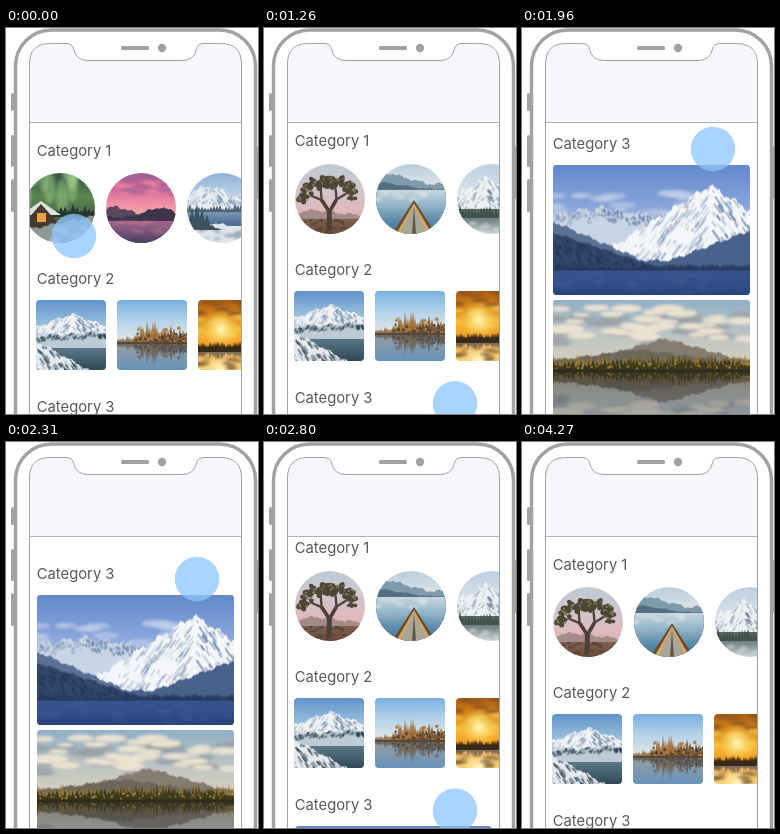
Recreate the animation shown at these times as an HTML page with a canvas. Size 252 px wide and 386 px high, loop 4.34 s.

```html
<!DOCTYPE html>
<html lang="en">
<head>
<meta charset="utf-8">
<title>Scrolling categories</title>
<style>
  html, body { margin: 0; width: 100%; height: 100%; overflow: hidden; background: #fff; }
  canvas { display: block; }
</style>
</head>
<body>
<canvas id="stage" width="252" height="386"></canvas>
<script>
const LOOP = 4340, STEP = 70, GREY = '#a2a2a4', SCROLL = 263.5;
const ctx = document.getElementById('stage').getContext('2d');

const clamp = v => Math.min(1, Math.max(0, v));
const ease = v => { v = clamp(v); return v * v * (3 - 2 * v); };

// ---- Picture helpers, all drawing into g ----
let g, seed;
const random = () => (seed = seed * 16807 % 2147483647) / 2147483647;
const jag = x => Math.sin(x * .31) + .6 * Math.sin(x * .83) + .4 * Math.sin(x * 1.9);

function photo(w, h, radius, paint) {
  const canvas = document.createElement('canvas');
  canvas.width = w;
  canvas.height = h;
  g = canvas.getContext('2d');
  seed = 77;
  g.beginPath();
  g.roundRect(0, 0, w, h, radius);
  g.clip();
  paint();
  return canvas;
}

function band(y0, y1, ...colors) {
  const fill = g.createLinearGradient(0, y0, 0, y1);
  colors.forEach((c, i) => fill.addColorStop(i / (colors.length - 1), c));
  g.fillStyle = fill;
  g.fillRect(0, y0, g.canvas.width, y1 - y0);
}

function triangle(color, x, top, base, half) {
  g.fillStyle = color;
  g.beginPath();
  g.moveTo(x - half, base);
  g.lineTo(x, top);
  g.lineTo(x + half, base);
  g.fill();
}

function specks(color, count, x, y, w, h, size, flat = 1) {
  g.fillStyle = color;
  for (let i = 0; i < count; i++) {
    const r = size * (.5 + random() / 2);
    g.beginPath();
    g.ellipse(x + w * random(), y + h * random(), r, r * flat, 0, 0, 7);
    g.fill();
  }
}

function clouds(color, count, y0, y1, size, flat = .25) {
  g.filter = 'blur(1.5px)';
  specks(color, count, 0, y0, g.canvas.width, y1 - y0, size, flat);
  g.filter = 'none';
}

function ridge(color, peak, top, base, spread, rough = 1) {
  const { width, height } = g.canvas;
  const surface = x =>
    base - (base - top) * Math.max(0, 1 - Math.abs(x - peak) / spread) + rough * jag(x + peak);
  const path = new Path2D(`M0 ${height}`);
  for (let x = 0; x <= width; x++) path.lineTo(x, surface(x));
  path.lineTo(width, height);
  g.fillStyle = color;
  g.fill(path);
  return { surface, path };
}

// A snowy ridge with rock streaks that run downhill, denser on the shaded right.
function mountain(snow, rock, peak, top, base, spread, rough) {
  const { surface, path } = ridge(snow, peak, top, base, spread, rough);
  const { width } = g.canvas;
  g.save();
  g.clip(path);
  g.strokeStyle = rock;
  for (let i = 0; i < width * 2.5; i++) {
    const x = width * random(), y = surface(x) + (base - top) * random();
    const side = x > peak ? 1 : -1, length = 2 + (base - top) * .15 * random();
    g.globalAlpha = (side > 0 ? .75 : .45) * random();
    g.lineWidth = 1 + 1.5 * random();
    g.beginPath();
    g.moveTo(x, y);
    g.lineTo(x + side * length * .7, y + length);
    g.stroke();
  }
  g.restore();
}

function trees(color, base, height, center = 0, spread = Infinity, gap = 2) {
  for (let x = 0; x < g.canvas.width + gap; x += gap) {
    const h = height * (.5 + .5 * random()) * Math.exp(-(((x - center) / spread) ** 2));
    triangle(color, x, base - h, base, gap);
  }
}

function reflect(y, alpha) {
  const { width, height } = g.canvas;
  g.save();
  g.globalAlpha = alpha;
  g.translate(0, 2 * y);
  g.scale(1, -1);
  g.drawImage(g.canvas, 0, 0, width, y, 0, 0, width, y);
  g.restore();
}

function branch(x, y, angle, length, depth) {
  const endX = x + length * Math.cos(angle), endY = y + length * Math.sin(angle);
  g.strokeStyle = '#4d3e36';
  g.lineWidth = 1 + 1.3 * depth;
  g.beginPath();
  g.moveTo(x, y);
  g.lineTo(endX, endY);
  g.stroke();
  if (depth) {
    for (const turn of [-.6, .5]) branch(endX, endY, angle + turn, length * .75, depth - 1);
  } else {
    specks('#4c4735', 12, endX - 5, endY - 5, 10, 10, 3);
    specks('#85785f', 6, endX - 5, endY - 5, 10, 8, 1.3);
  }
}

// ---- Pictures ----
function desertTree() {
  band(0, 70, '#c0cad6', '#cfc6cf', '#dfb9bd', '#c99c98');
  ridge('#a58a8c', 20, 46, 51, 40);
  band(55, 70, '#80604c', '#694a3a');
  specks('#57463a', 40, 0, 56, 70, 14, 2.5, .5);
  branch(34, 67, -1.55, 19, 3);
}

function canoe() {
  band(0, 25, '#b8cddb', '#e2e7e8');
  ridge('#7f9aad', 12, 9, 20, 40);
  ridge('#526f80', 4, 18, 25, 45, .5);
  band(26, 70, '#c7d8df', '#97b7ca', '#608eac', '#416f90');
  clouds('#dbe4e6', 12, 28, 36, 5);
  ['#6c4a30', '#d2a667', '#a9a696'].forEach((c, i) => triangle(c, 38, 36 + 3 * i, 70, 22 - 4 * i));
  triangle('#5e554b', 38, 43, 70, 2);
}

function snowPeak() {
  band(0, 45, '#bfd0e1', '#e3e9ed');
  mountain('#eef1f3', '#71859a', 30, 13, 36, 40, 2);
  band(45, 70, '#56665f', '#7d8c8c', '#ccd5d9');
  trees('#41534e', 54, 14, 0, Infinity, 3);
  clouds('#dfe5e7', 18, 58, 70, 4);
}

function aurora() {
  band(0, 70, '#33533f', '#5b8550', '#476148', '#59604e');
  clouds('#9fd28a70', 12, -5, 25, 6, 3);
  trees('#26382e', 44, 13, 0, Infinity, 4);
  triangle('#dce2dc', 16, 28, 42, 20);
  triangle('#47392e', 16, 31, 58, 24);
  g.fillStyle = '#e8a143';
  g.fillRect(12, 40, 9, 9);
  ridge('#8d9996', 70, 43, 55, 60);
  clouds('#cbd3d0', 18, 55, 68, 5, .4);
}

function pinkDusk() {
  band(0, 46, '#a85f96', '#ce6798', '#f18fa5', '#f4b2a7');
  clouds('#e985a5', 15, 8, 26, 10, .16);
  clouds('#93608f', 12, 2, 22, 9, .15);
  ridge('#5a465f', 10, 33, 42, 25);
  ridge('#3e344c', 54, 34, 44, 30);
  band(48, 70, '#a5658b', '#745376', '#47405e');
  clouds('#d0809b', 12, 49, 63, 7, .1);
}

function winterLake() {
  band(0, 28, '#8eb1d7', '#c8d9e9');
  mountain('#e6edf3', '#8098b3', 22, 13, 28, 40, 2);
  trees('#4d6173', 40, 9, 0, Infinity, 3);
  band(39, 53, '#7897b6', '#49698f');
  ridge('#e0e6eb', 0, 46, 54, 50);
  clouds('#8499aa', 14, 55, 67, 5, .3);
  trees('#3d5261', 57, 32, 10, 12, 5);
}

function glacier() {
  band(0, 30, '#5f94ca', '#a8c8e1');
  mountain('#f0f3f6', '#7890aa', 36, 14, 28, 38, 1.2);
  mountain('#bccbd5', '#1f3645', 60, 32, 36, 60, 1);
  band(48, 70, '#5c7887', '#2f4856');
  mountain('#e3e9ed', '#33495a', 0, 41, 74, 60, 1);
}

function autumnLake() {
  band(0, 43, '#79b0e0', '#b5d3ea', '#e3e8e6');
  trees('#92795b', 43, 8);
  trees('#9a7244', 43, 27, 34, 16);
  trees('#7d5a38', 43, 19, 58, 24, 3);
  specks('#b07c40', 30, 20, 28, 50, 14, 2);
  specks('#4f402f', 34, 18, 33, 52, 10, 1.5);
  reflect(43, .88);
  band(43, 70, '#33404d70', '#2b61958c');
  band(42, 44, '#54483a', '#54483a');
}

function goldenDusk() {
  band(0, 49, '#a85a14', '#d88a1b', '#f5b735', '#ed9721');
  clouds('#8b5520', 12, 0, 14, 9, .22);
  clouds('#f8cc58', 14, 16, 38, 9, .15);
  const glow = g.createRadialGradient(23, 29, 1, 23, 29, 19);
  glow.addColorStop(0, '#fff5af');
  glow.addColorStop(1, '#ffd34a00');
  g.fillStyle = glow;
  g.fillRect(0, 8, 50, 40);
  trees('#4b3215', 50, 9);
  reflect(50, .7);
  band(47, 52, '#382a18', '#382a18');
  clouds('#5b3d1b', 14, 54, 69, 7, .16);
}

function blueRange() {
  band(0, 75, '#6488cb', '#84a2da', '#b4c6e6');
  clouds('#c3d0e8a0', 20, 28, 48, 14);
  mountain('#c9d5e6', '#6f88ae', 48, 43, 53, 70, 2);
  mountain('#f4f6f9', '#6682a8', 157, 21, 84, 100, 2);
  ridge('#5a7095', 0, 57, 98, 95);
  ridge('#48628b', 197, 66, 96, 80);
  mountain('#33476a', '#1f3355', 0, 68, 101, 100, .8);
  trees('#263a5c', 108, 9);
  band(106, 130, '#3a5388', '#314f8c', '#2a447a');
  clouds('#4a68a0', 30, 109, 129, 9, .06);
}

function stillWater() {
  band(0, 68, '#8fb0c6', '#bcc3c4', '#dbd2bf');
  clouds('#9aa3a8', 22, 14, 44, 18, .2);
  clouds('#ece2d0', 34, 8, 40, 16);
  ridge('#857c72', 112, 39, 60, 75);
  ridge('#6b675c', 85, 50, 62, 90);
  trees('#8f7536', 71, 18);
  trees('#574a22', 71, 18, 130, 90, 3);
  trees('#3d391c', 71, 12, 0, Infinity, 4);
  specks('#b99a45', 60, 0, 64, 197, 5, 1.5, .6);
  reflect(71, .85);
  band(71, 130, '#2b2a2270', '#50667940');
  band(70, 73, '#2f2c1a', '#2f2c1a');
}

const circles = [desertTree, canoe, snowPeak, aurora, pinkDusk, winterLake].map(p => photo(70, 70, 35, p));
const cards = [glacier, autumnLake, goldenDusk].map(p => photo(70, 70, 4, p));
const banners = [blueRange, stillWater].map(p => photo(197, 130, 4, p));

// ---- Phone ----
const screen = new Path2D(`M23.5 400V36Q23.5 15.5 44 15.5H60Q66.5 15.5 67.5 21
  Q70 32.5 82 32.5H176Q188 32.5 190.5 21Q191.5 15.5 198 15.5H214.5Q235.5 15.5 235.5 36V400`);

function bar(x, y, w, h) {
  ctx.fillStyle = GREY;
  ctx.beginPath();
  ctx.roundRect(x, y, w, h, 1.5);
  ctx.fill();
}

function drawContent(shift, scroll) {
  ctx.save();
  ctx.beginPath();
  ctx.rect(24, 95, 211, 291);
  ctx.clip();
  ctx.translate(0, -scroll);
  ctx.font = '14.8px Inter, Roboto, sans-serif';
  ctx.fillStyle = '#58585a';
  for (let i = 0; i < 3; i++) ctx.fillText('Category ' + (i + 1), 30.7, 127.5 + 128.3 * i);
  circles.forEach((c, i) => ctx.drawImage(c, 31 + 81 * i - shift, 145));
  cards.forEach((c, i) => ctx.drawImage(c, 30 + 81 * i, 272));
  banners.forEach((c, i) => ctx.drawImage(c, 31, 400 + 135 * i));
  ctx.restore();
}

function drawPhone() {
  ctx.save();
  ctx.clip(screen);
  ctx.fillStyle = '#f8f6fa';
  ctx.fillRect(23, 15, 213, 79);
  ctx.fillStyle = '#b2b2b4';
  ctx.fillRect(23, 94, 213, 1);
  ctx.restore();
  ctx.strokeStyle = GREY;
  ctx.lineWidth = 1;
  ctx.stroke(screen);
  ctx.lineWidth = 3.5;
  ctx.beginPath();
  ctx.roundRect(9.5, 2, 240, 450, 36);
  ctx.stroke();
  bar(5, 65, 3, 18);
  bar(5, 107, 3, 32);
  bar(5, 151, 3, 33);
  bar(250, 118, 2, 53);
  bar(115, 18, 28, 4);
  ctx.beginPath();
  ctx.arc(156, 20, 4.2, 0, 7);
  ctx.fill();
}

// The finger mark swells and fades for 210 ms after release.
function drawTouch(x, y, sinceRelease) {
  const k = clamp(sinceRelease / 210);
  ctx.fillStyle = `rgba(140, 198, 255, ${.75 * (1 - k)})`;
  ctx.beginPath();
  ctx.arc(x, y, 22.3 + 11.7 * (1 - (1 - k) ** 2.5), 0, 7);
  ctx.fill();
}

function render(t) {
  const shift = 255 * (1 - ease(t / 530));
  const scroll = SCROLL * (ease((t - 1182) / 700) - ease((t - 2205) / 700));
  ctx.fillStyle = '#fff';
  ctx.fillRect(0, 0, 252, 386);
  drawContent(shift, scroll);
  drawPhone();
  if (t < 700) drawTouch(68 + 140 * ease(t / 490), 208, t - 490);
  if (t >= 1190 && t < 3120) drawTouch(191, 384.5 - scroll, t - 2910);
}

const start = performance.now();
function tick() {
  const t = (performance.now() - start) % LOOP;
  render(Math.floor(t / STEP) * STEP);
  requestAnimationFrame(tick);
}
tick();
</script>
</body>
</html>
```
